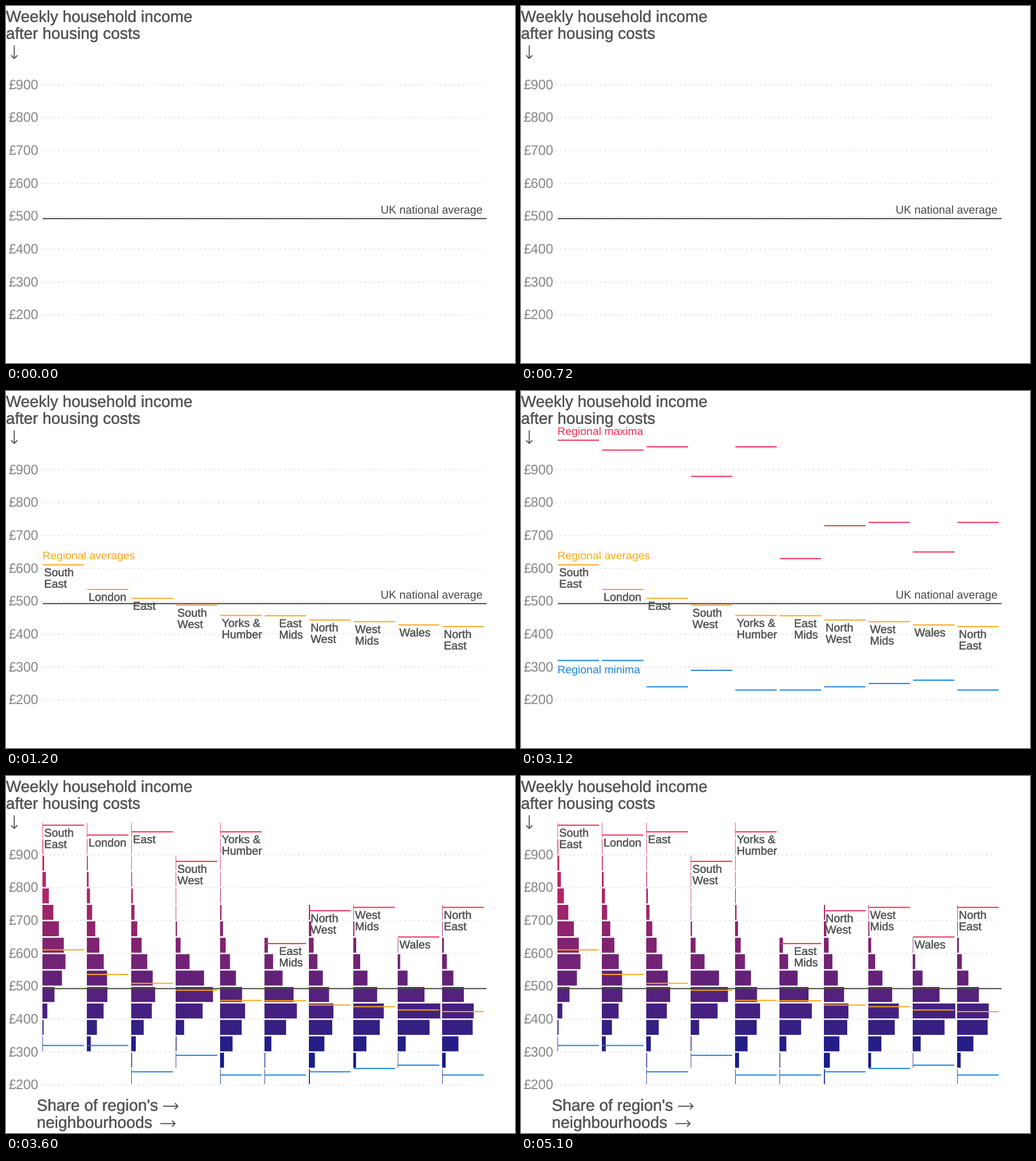
A matplotlib script for the animation above (6.1 s loop, 894 by 626 pixels).

```python
import math

import matplotlib.pyplot as plt
from matplotlib.animation import FuncAnimation
from matplotlib.colors import LinearSegmentedColormap
from matplotlib.patches import Rectangle
from matplotlib.patheffects import withStroke

W, H, DPI = 894, 626, 100
PT = 72 / DPI
STEP_MS, FRAMES, STAGE_MS = 100, 61, 1200
ALL, AVERAGES, EXTREMES, BARS = (0, 1, 2, 3), (1, 2, 3), (2, 3), (3,)

DARK, TEXT, GREY, DOTS = "#484848", "#555555", "#858585", "#c6c6c6"
ORANGE, RED, BLUE = "#f9a71f", "#f42c55", "#1583e0"
RAMP = LinearSegmentedColormap.from_list("income", ["#081c8e", "#eb2a58"])

LEFT, PITCH, COLUMN = 64.5, 78, 72.5
BAND, FULL_SHARE, THIN = 50, 215, 0.8

# Weekly income per region: average, spread, maximum, minimum.
REGIONS = {
    "South\nEast": (611, 110, 990, 320),
    "London": (536, 125, 960, 320),
    "East": (509, 108, 970, 240),
    "South\nWest": (488, 67, 880, 290),
    "Yorks &\nHumber": (457, 104, 970, 230),
    "East\nMids": (456, 77, 630, 230),
    "North\nWest": (443, 105, 730, 240),
    "West\nMids": (438, 83, 740, 250),
    "Wales": (428, 58, 650, 260),
    "North\nEast": (423, 77, 740, 230),
}

plt.rcParams["font.family"] = "Liberation Sans"
plt.rcParams["text.hinting"] = "none"
fig = plt.figure(figsize=(W / DPI, H / DPI), dpi=DPI, facecolor="white")
ax = fig.add_axes([0, 0, 1, 1])
ax.set(xlim=(0, W), ylim=(H, 0))
ax.axis("off")

staged = []


def keep(artist, stages):
    staged.append((artist, stages))


def income_y(pounds):
    return 138.2 + (900 - pounds) * 0.5764


def line(xs, ys, color, width, stages, z=3, **style):
    style.setdefault("solid_capstyle", "butt")
    keep(ax.plot(xs, ys, color=color, lw=width * PT, zorder=z,
                 snap=False, **style)[0], stages)


def text(x, baseline, words, size, color, stages, weight=0, leading=20, align="left"):
    for row, part in enumerate(words.split("\n")):
        label = ax.text(x, baseline + row * leading, part, size=size * PT,
                        color=color, ha=align, va="baseline", zorder=6)
        if weight:
            label.set_path_effects([withStroke(linewidth=weight * PT, foreground=color)])
        keep(label, stages)


def arrow(x, y, dx, dy, length, stages, head=5.5):
    """Open-headed arrow whose tip is at (x, y), pointing along (dx, dy)."""
    line([x - dx * length, x], [y - dy * length, y], TEXT, 1.9, stages)
    back_x, back_y = x - dx * head, y - dy * head
    line([back_x - dy * head, x, back_x + dy * head],
         [back_y - dx * head, y, back_y + dx * head], TEXT, 1.9, stages)


def draw_axis():
    text(0, 28, "Weekly household income\nafter housing costs", 28.1, TEXT, ALL,
         weight=0.35, leading=29.5)
    arrow(14.5, 92, 0, 1, 23, ALL)
    for pounds in range(200, 1000, 100):
        y = income_y(pounds)
        text(56.5, y + 8.3, f"£{pounds}", 23.6, GREY, ALL, align="right")
        line([61, 834], [y, y], DOTS, 1.5, ALL, z=1,
             linestyle=(0, (1, 4.2)), dash_capstyle="butt")
    y = income_y(493)
    line([64.5, 844], [y, y], DARK, 2, ALL, z=4)
    text(837, 363.5, "UK national average", 19.8, DARK, (0, 1, 2), align="right")


def share_length(pounds, mean, spread):
    """Bar length for the band centred on pounds, from a log-normal curve."""
    sigma = math.sqrt(math.log(1 + (spread / mean) ** 2))
    z = (math.log(pounds / mean) + sigma ** 2 / 2) / sigma
    density = math.exp(-z * z / 2) / (pounds * sigma * math.sqrt(2 * math.pi))
    return max(THIN, FULL_SHARE * BAND * density)


def draw_bars(left, mean, spread, highest, lowest):
    for band in range(lowest // BAND * BAND, highest, BAND):
        top, bottom = income_y(band + BAND) + 1.3, income_y(band) - 1.3
        length = share_length(band + BAND / 2, mean, spread)
        bar = Rectangle((left, top), length, bottom - top, lw=0, zorder=2,
                        color=RAMP((band - 200) / 750), snap=False)
        keep(ax.add_patch(bar), BARS)


def draw_region(i, name, mean, spread, highest, lowest):
    left = LEFT + PITCH * i
    for pounds, color, stages in ((mean, ORANGE, AVERAGES),
                                  (highest, RED, EXTREMES),
                                  (lowest, BLUE, EXTREMES)):
        y = income_y(pounds)
        line([left, left + COLUMN], [y, y], color, 2, stages, z=5)
    label_x = left + (25 if name == "East\nMids" else 2.5)
    for pounds, stages in ((mean, (1, 2)), (highest, BARS)):
        text(label_x, income_y(pounds) + 20, name, 19.9, TEXT, stages, weight=0.35)
    draw_bars(left - 0.5, mean, spread, highest, lowest)


def draw_keys():
    text(64, 295.5, "Regional averages", 19.5, ORANGE, (1, 2))
    text(64, 77, "Regional maxima", 19.5, RED, (2,))
    text(64, 495, "Regional minima", 19.5, BLUE, (2,))
    text(54, 587, "Share of region's\nneighbourhoods", 28.3, TEXT, BARS,
         weight=0.35, leading=30)
    for x, y in ((302, 579), (297, 609.5)):
        arrow(x, y, 1, 0, 26, BARS)


def update(frame):
    stage = min(frame * STEP_MS // STAGE_MS, 3)
    for artist, stages in staged:
        artist.set_visible(stage in stages)
    return [artist for artist, _ in staged]


draw_axis()
for index, (region, figures) in enumerate(REGIONS.items()):
    draw_region(index, region, *figures)
draw_keys()

animation = FuncAnimation(fig, update, frames=FRAMES, interval=STEP_MS,
                          init_func=lambda: update(0), repeat=True,
                          repeat_delay=0, blit=False)
plt.show()
```
